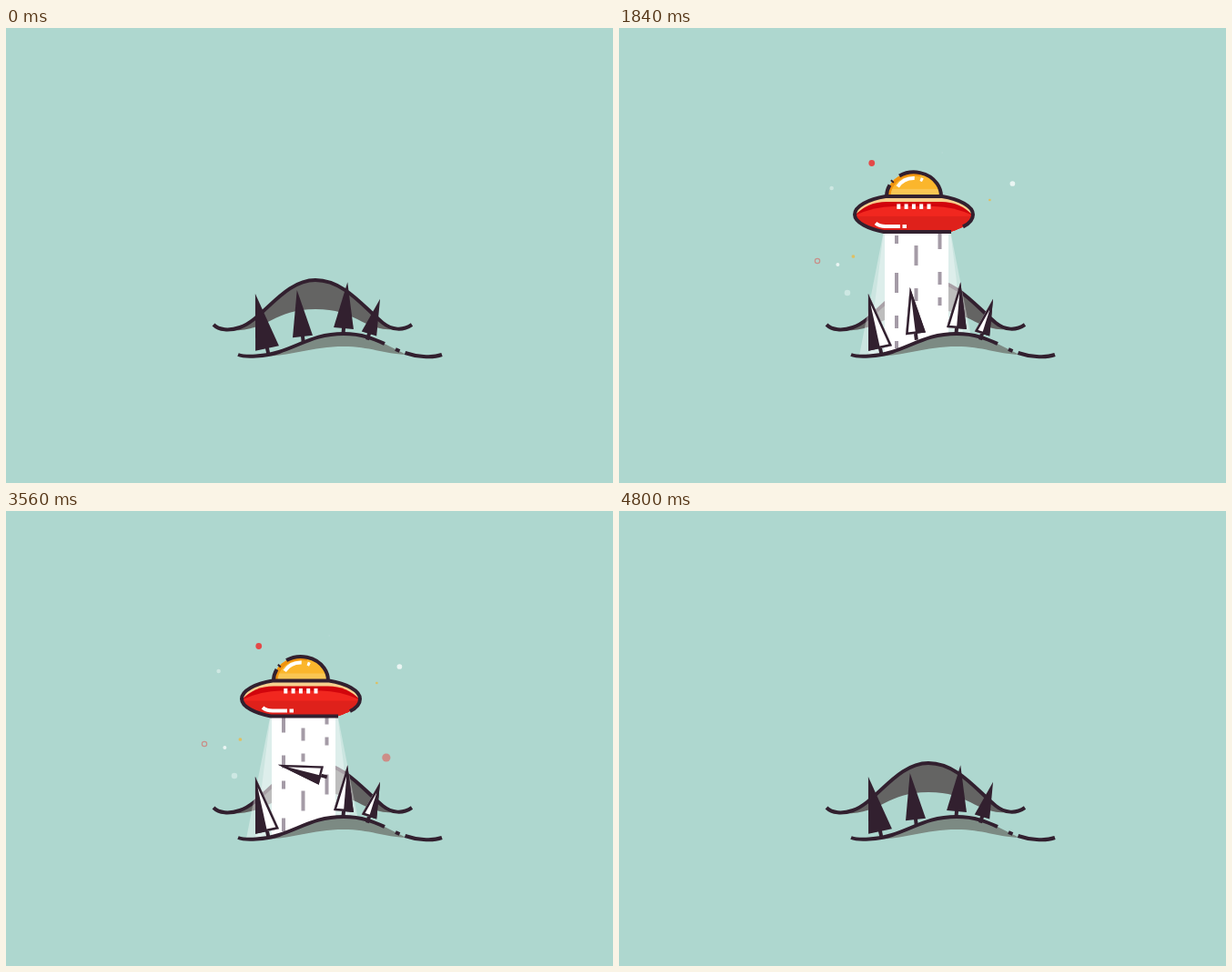
An HTML page with a canvas that plays this animation: 667 by 500 pixels, repeating every 5 s.

```html
<!DOCTYPE html>
<html>
<head>
<meta charset="utf-8">
<style>
html, body { margin: 0; width: 100%; height: 100%; overflow: hidden; background: #aed7cf; }
canvas { display: block; }
</style>
</head>
<body>
<canvas id="stage" width="667" height="500"></canvas>
<script>
const ctx = document.getElementById('stage').getContext('2d');
const LOOP = 5000, STEP = 40, TAU = Math.PI * 2, RAD = Math.PI / 180;
const BG = '#aed7cf', DARK = '#32202f', WHITE = '#fff', RED = '#f02a2a', YELLOW = '#f0b73c';

const mix = (a, b, u) => a + (b - a) * u;
const wave = u => (1 - Math.cos(u * TAU)) / 2;

// Progress from 0 to 1 between two times, and the same with soft ends.
const ramp = (t, from, to) => Math.min(1, Math.max(0, (t - from) / (to - from)));
const ease = (t, from, to) => wave(ramp(t, from, to) / 2);

function fill(shape, color) {
  ctx.fillStyle = color;
  ctx.fill(shape);
}

function stroke(shape, width = 4, color = DARK) {
  ctx.lineWidth = width;
  ctx.strokeStyle = color;
  ctx.stroke(shape);
}

function box(x, y, w, h, color) {
  ctx.fillStyle = color;
  ctx.fillRect(x, y, w, h);
}

function polygon(...points) {
  const p = new Path2D();
  points.forEach(([x, y]) => p.lineTo(x, y));
  p.closePath();
  return p;
}

const line = (x0, y0, x1, y1) => new Path2D(`M${x0},${y0}L${x1},${y1}`);

function clipped(shape, draw) {
  ctx.save();
  ctx.clip(shape);
  draw();
  ctx.restore();
}

// Landscape
const backTop = 'M228,326C234,332 245,333 257,329C283,320 305,277 340,277C372,277 394,308 414,324C424,332 436,333 446,326';
const backLine = new Path2D(backTop);
const backFill = new Path2D(backTop + 'L438,331C390,336 390,309 340,309C290,309 290,336 238,332Z');
const frontTop = 'M255,359C263,362 285,361 300,356C325,348 340,336 371,336C392,336 405,342 416,347';
const frontLine = new Path2D(frontTop + 'M428,353L432.500,355M438.500,357C450,361 468,363 479,359');
const frontFill = new Path2D(frontTop + 'L440,359C415,358 400,350 371,350C335,350 310,362 275,361Z');
const aboveFront = new Path2D(frontTop + 'L416,200L255,200Z');

// Trees stand on the middle of their base and lean by degrees.
const trees = [
  { x: 287, y: 352, height: 61.5, lean: -12.3 },
  { x: 326, y: 339, height: 51.5, lean: -7 },
  { x: 371, y: 330, height: 51, lean: 4.8 },
  { x: 399, y: 336, height: 40, lean: 17.5 }
];
const lifted = trees[1];

// The lit half slides over the base: side 0 is left, 1 is right.
function drawTree({ x, y, height, lean }, glow, side) {
  const half = height * 0.215, tip = [0, -height];
  const body = polygon(tip, [-half, 0], [half, 0]);
  ctx.save();
  ctx.translate(x, y);
  ctx.rotate(lean * RAD);
  stroke(line(0, -2, 0, 7));
  fill(body, DARK);
  if (glow > 0) {
    const from = mix(-half, half, side * (1 - glow / 2));
    fill(polygon(tip, [from, 0], [from + half * glow, 0]), WHITE);
    clipped(body, () => stroke(body, 5));
  }
  ctx.restore();
}

// Spin slowly upward, then get sucked in; later grow back on the spot.
function drawLifted(t, glow) {
  if (t >= 3960 && t < 4480) return;
  const back = t >= 4480;
  const pull = ramp(t, 3560, 3960) ** 2;
  const rise = ramp(t, 1640, 3560) * 28.5 + pull * 85;
  const size = back ? ease(t, 4400, 4720) : 1 - 0.05 * ramp(t, 1640, 3560) - 0.4 * pull;
  const pivotY = back ? 346 : 313.5;
  ctx.save();
  ctx.translate(322.5, pivotY - (back ? 0 : rise));
  if (!back) ctx.rotate(-Math.max(0, t - 1840) * 0.04 * RAD);
  ctx.scale(size, size);
  ctx.translate(-322.5, -pivotY);
  drawTree(lifted, glow, ramp(t, 3000, 3500));
  ctx.restore();
}

function drawTrees(t) {
  const glow = ramp(t, 800, 1200) - ramp(t, 3920, 4200);
  const calm = ramp(t, 1200, 1600) - ramp(t, 3560, 3760);
  const sway = calm * wave((t - 1840) / 1720);
  trees.forEach((tree, i) => {
    if (tree === lifted) drawLifted(t, glow);
    else drawTree({ ...tree, lean: tree.lean + sway * (i === 2 ? -3 : 3) }, glow, i === 0 ? 1 : 0);
  });
}

// Light beam: three columns share one dash pattern running upward.
const DASHES = [22, 25, 14, 14, 9, 32];

function drawBeam(t) {
  const bottom = mix(222, 362, ramp(t, 1040, 1360) - ramp(t, 3760, 4000));
  if (bottom <= 222) return;
  clipped(aboveFront, () => {
    const reach = new Path2D();
    reach.rect(250, 215, 150, bottom - 215);
    ctx.clip(reach);
    for (const spread of [27, 17]) {
      fill(polygon([291, 222], [364, 222], [364 + spread, 360], [291 - spread, 360]), 'rgba(255,255,255,.35)');
    }
    box(292, 220, 70, 140, WHITE);
    ctx.setLineDash(DASHES);
    for (const [x, shift] of [[305, 49], [326.5, 19], [352.5, 1]]) {
      ctx.lineDashOffset = (t - 1840) * 0.23 - shift;
      stroke(line(x, 220, x, 352), 4, '#a49ba6');
    }
    ctx.setLineDash([]);
  });
}

// Bubbles: x, y, radius, delay of the first one in ms, colour
const BUBBLE_START = 1300, BUBBLE_END = 3600, BUBBLE_PERIOD = 860;
const bubbles = [
  [279.5, 148.5, 4.6, 350, RED],
  [355.5, 137, 5.2, 505, WHITE],
  [434, 171, 4.3, 368, WHITE],
  [235, 176, 4, 394, '#e0f0ed'],
  [242, 260, 3, 368, WHITE],
  [254, 291, 3.3, 213, '#cfe8e4'],
  [259, 251, 2.8, 368, YELLOW],
  [409, 189, 2, 368, YELLOW],
  [422, 271, 4.6, 1813, '#e0605c']
];

function drawBubble(t, [x, y, size, delay, color], ring) {
  const age = t - BUBBLE_START - delay;
  const p = age / BUBBLE_PERIOD % 1;
  if (age < 0 || t - p * BUBBLE_PERIOD > BUBBLE_END || p > 0.8) return;
  ctx.globalAlpha = Math.min(1, p / 0.27, (0.8 - p) / 0.45);
  const dot = new Path2D();
  dot.arc(x - (ring ? 0 : 8 * p), y, size * Math.min(1, p / 0.3), 0, TAU);
  if (ring) stroke(dot, 1 + 1.4 * ramp(p, 0.1, 0.3), color);
  else fill(dot, color);
  ctx.globalAlpha = 1;
}

// Saucer
const hull = new Path2D('M293,185C274,188 259,196 259,205C259,214 275,221 291,224L364,224C377,220 389,214 389,205C389,196 374,188 355,185Z');
const hullLine = new Path2D('M365,224L291,224C275,221 259,214 259,205C259,196 274,188 293,185L355,185C374,188 389,196 389,205C389,211 385,215 378,218.500');

// A band that fills the hull below a curve from tip to tip.
const band = (top, inset) => new Path2D(
  `M259,206Q${259 + inset},${top} ${280 + inset},${top}L${368 - inset},${top}Q${389 - inset},${top} 389,206V230H259Z`);

function domeArc(from, to, rx = 30, ry = 26.5) {
  const p = new Path2D();
  p.ellipse(324, 185, rx, ry, 0, from * RAD, to * RAD);
  return p;
}

// Dash in past the middle, settle, later back up and shoot away.
function saucerX(t) {
  if (t < 720) return 35 - 425 * (1 - ramp(t, 360, 720)) ** 3;
  if (t < 4480) return 35 * (1 - ease(t, 720, 1000)) - 57 * ease(t, 4280, 4480);
  return -57 + 2.4 * ((t - 4480) / 40) ** 3;
}

function drawSaucer(t) {
  if (t < 360 || t >= 4720) return;
  const bob = 2.2 * Math.cos((Math.min(t, 4120) - 3520) / 940 * TAU) - 0.6;
  ctx.save();
  ctx.translate(saucerX(t), mix(-2.7, bob, ramp(t, 900, 1300)));

  clipped(domeArc(180, 360), () => {
    box(290, 150, 70, 40, '#fbb62c');
    box(290, 177, 70, 12, '#fac653');
    stroke(domeArc(180, 285, 28, 25), 5, '#f0930f');
  });
  for (const [from, to] of [[212, 272], [290, 298]]) stroke(domeArc(from, to, 21, 20), 4, WHITE);
  for (const [from, to] of [[180, 208], [216, 220], [238, 360]]) stroke(domeArc(from, to));

  clipped(hull, () => {
    fill(hull, '#f6d08e');
    fill(band(191, 14), '#d1050c');
    fill(band(196, 22), '#f1271f');
    box(259, 207, 130, 25, '#df211b');
  });
  stroke(hullLine);
  for (let i = 0; i < 5; i++) box(305.3 + i * 8.3, 193.5, 4, 5.5, WHITE);
  stroke(new Path2D('M282,214.500Q286,218 293,218H309M311.500,218H316'), 4, WHITE);
  ctx.restore();
}

// Speed marks left behind on arrival
function drawTrail(t) {
  if (t > 520 && t < 960) {
    const head = mix(60, 236, ramp(t, 520, 720));
    const tail = mix(40, 236, ramp(t, 520, 930));
    ctx.setLineDash([8, 12]);
    ctx.lineDashOffset = 0;
    stroke(line(head, 174.5, Math.min(head, tail), 174));
    ctx.setLineDash([]);
  }
  if (t >= 800 && t < 960) stroke(new Path2D('M358.500,156L361.500,153M365.500,159L371,167'));
}

function draw(t) {
  box(0, 0, 667, 500, BG);
  fill(backFill, '#646463');
  stroke(backLine);
  drawBeam(t);
  fill(frontFill, '#7c8a83');
  stroke(frontLine);
  drawTrees(t);
  bubbles.forEach(bubble => drawBubble(t, bubble));
  drawBubble(t, [218, 256, 6.2, 430, '#e8403c'], true);
  drawTrail(t);
  drawSaucer(t);
}

function frame() {
  draw(Math.floor(performance.now() % LOOP / STEP) * STEP);
  requestAnimationFrame(frame);
}
frame();
</script>
</body>
</html>
```
